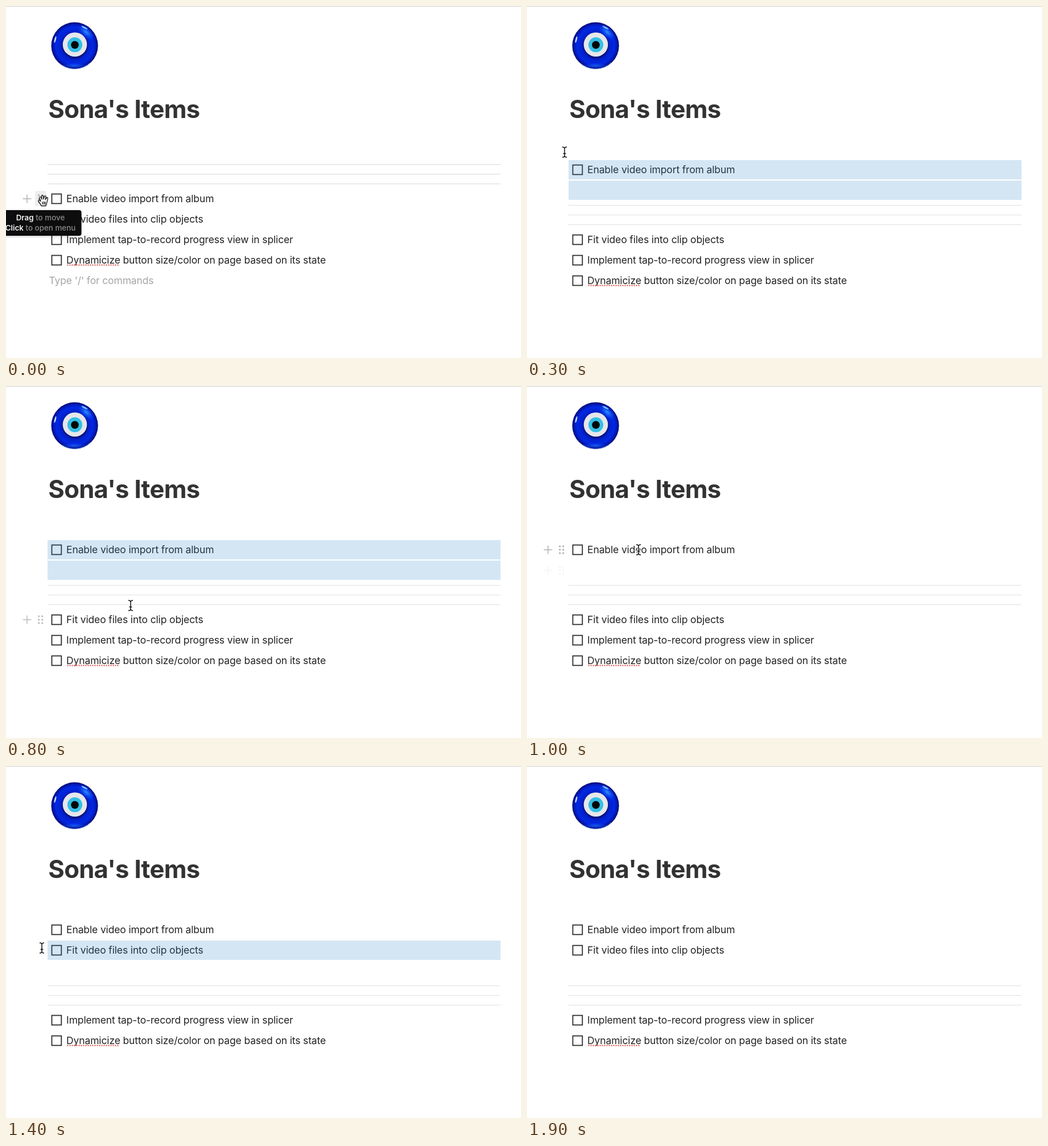
Animation of 905 by 619 pixels, one loop 2 s. Source, as an HTML page:

```html
<!DOCTYPE html>
<html lang="en">
<head>
<meta charset="utf-8">
<title>Items</title>
<style>
  html, body { margin: 0; width: 100%; height: 100%; overflow: hidden; background: #fff; }
  svg { display: block; width: 905px; height: 619px; font-family: Inter, "Liberation Sans", sans-serif; }
  text { white-space: pre; }
  .title { font-size: 43.6px; font-weight: 700; letter-spacing: -.7px; fill: #323232; }
  .row { font-size: 17.5px; letter-spacing: -.14px; fill: #222221; }
  .hint { fill: #a6a5a3; }
  .box { fill: none; stroke: #2c2c2a; stroke-width: 1.8; }
  .typo { stroke: #df625c; stroke-width: 2.5; stroke-linecap: round; stroke-dasharray: 0 4; }
  .rule { fill: #e1e1e0; }
  .select { fill: #2882c8; }
  .plus { fill: none; stroke: #999896; stroke-width: 1.5; }
  .dot { fill: #999896; }
  .tip { font-size: 13.4px; font-weight: 500; fill: #8b8b8b; text-anchor: middle; }
  .tip tspan { font-weight: 600; fill: #f4f4f4; }
  .hand { fill: #fff; stroke: #111; stroke-width: 1.3; stroke-linejoin: round; stroke-linecap: round; }
  .beam { fill: none; stroke: #111; stroke-width: 1.5; }
  .halo { stroke: #fff; stroke-width: 3.6; stroke-linecap: square; }
</style>
</head>
<body>
<svg viewBox="0 0 905 619">
  <defs>
    <radialGradient id="glass" cx=".5" cy=".5" r=".5">
      <stop offset=".5" stop-color="#0618a4"/>
      <stop offset=".64" stop-color="#0222d2"/>
      <stop offset=".8" stop-color="#0228e4"/>
      <stop offset=".91" stop-color="#0318b4"/>
      <stop offset="1" stop-color="#040c70"/>
    </radialGradient>
    <radialGradient id="shine">
      <stop offset="0" stop-color="#2f92ff"/>
      <stop offset="1" stop-color="#0a4cff" stop-opacity="0"/>
    </radialGradient>
    <filter id="shadow" x="-20%" y="-30%" width="140%" height="170%">
      <feDropShadow dx="0" dy="1" stdDeviation="2" flood-opacity=".25"/>
    </filter>
  </defs>
  <rect width="905" height="1" fill="#cdcdcd"/>
  <g>
    <circle cx="120.6" cy="69.7" r="41.1" fill="url(#glass)"/>
    <ellipse cx="141" cy="46" rx="18" ry="9" transform="rotate(42 141 46)" fill="url(#shine)"/>
    <ellipse cx="120" cy="105" rx="24" ry="5" fill="url(#shine)" opacity=".55"/>
    <path d="M98 103.5A40.6 40.6 0 0 0 148 99.5" fill="none" stroke="#4a6cdc" stroke-width="1"/>
    <ellipse cx="86.5" cy="59" rx="1.3" ry="6" transform="rotate(14 86.5 59)" fill="#d4e6ff"/>
    <ellipse cx="138" cy="38" rx="6" ry="1.4" transform="rotate(28 138 38)" fill="#7cc2ff"/>
    <circle cx="121.5" cy="70" r="22" fill="#050f6c" opacity=".7"/>
    <circle cx="121" cy="67.8" r="21.3" fill="#e6e6ea"/>
    <circle cx="121" cy="68.2" r="13.1" fill="#35bfe4"/>
    <circle cx="121" cy="68.4" r="6.8" fill="#050608"/>
  </g>
  <text class="title" x="74.3" y="197.3">Sona's Items</text>
  <g id="scene"></g>
</svg>
<script>
const STEP = 100;
const tasks = [
  "Enable video import from album",
  "Fit video files into clip objects",
  "Implement tap-to-record progress view in splicer",
  "Dynamicize button size/color on page based on its state"
];
const layouts = [
  { rows: [339, 375, 411, 447], rules: 278, hint: 483 },
  { rows: [288, 411, 447, 483], rules: 350 },
  { rows: [288, 324, 447, 483], rules: 386 }
];
const pair = [[288, .2], [324, .2]];

// Each step: layout, cursor [shape, x, y], then [y, opacity] lists and drag details.
const steps = [
  { layout: 0, cursor: ["open", 65, 342], grips: [[339, .75]], hover: 339, tip: true },
  { layout: 0, cursor: ["closed", 65, 318], drag: 0 },
  { layout: 0, cursor: ["closed", 66, 274], drag: 0, drop: 270 },
  { layout: 1, cursor: ["beam", 66, 257], selected: pair },
  { layout: 1, cursor: ["beam", 78, 310], selected: pair },
  { layout: 1, cursor: ["beam", 114, 402], selected: [...pair, [411, .15]], grips: [[367, .14], [384, .35], [411, 1]] },
  { layout: 1, cursor: ["beam", 170, 404], selected: pair, grips: [[411, .8]] },
  { layout: 1, cursor: ["beam", 212, 394], selected: pair, grips: [[411, .7]] },
  { layout: 1, cursor: ["beam", 219, 386], selected: pair, grips: [[411, .65]] },
  { layout: 1, cursor: ["beam", 209, 334], selected: pair, grips: [[324, .6]] },
  { layout: 1, cursor: ["beam", 196, 288], grips: [[288, .75], [324, .1]] },
  { layout: 1, cursor: ["beam", 130, 346], grips: [[324, .3]] },
  { layout: 1, cursor: ["open", 63, 411], grips: [[411, .75]], hover: 411 },
  { layout: 1, cursor: ["closed", 63, 352], drag: 1, drop: 306 },
  { layout: 2, cursor: ["beam", 63, 320], selected: [[324, .2]] },
  { layout: 2, cursor: ["beam", 68, 320], selected: [[324, .2]] },
  { layout: 2, cursor: ["beam", 92, 321], selected: [[324, .2]] },
  { layout: 2, cursor: ["beam", 120, 321] },
  { layout: 2, cursor: ["beam", 131, 321] },
  { layout: 2 }
];

const rect = (cls, x, y, w, h, extra = "") =>
  `<rect class="${cls}" x="${x}" y="${y}" width="${w}" height="${h}" ${extra}/>`;

const label = (text, x, y, cls = "") =>
  `<text class="row ${cls}" x="${x}" y="${y + 6.3}">${text}</text>`;

function task(index, y) {
  const typo = index === 3 ? `<path class="typo" d="M108.5 ${y + 8.6}H200"/>` : "";
  return rect("box", 80.5, y - 8.4, 16.8, 16.8) + label(tasks[index], 106.1, y) + typo;
}

function grip(y, alpha) {
  let dots = "";
  for (const x of [56.2, 62.2])
    for (const dy of [-6, 0, 6]) dots += rect("dot", x, y + dy - 1.5, 3, 3, 'rx="1"');
  return `<g opacity="${alpha}"><path class="plus" d="M29.5 ${y}h15m-7.5-7.5v15"/>${dots}</g>`;
}

const tooltip = () =>
  rect("", -10, 359, 142.5, 45, 'rx="4" fill="#0c0c0c" filter="url(#shadow)"') +
  '<text class="tip" x="60.5" y="377"><tspan>Drag</tspan> to move</text>' +
  '<text class="tip" x="60.5" y="395"><tspan>Click</tspan> to open menu</text>';

const beam = "M-4-9q4 0 4 3q0-3 4-3M0-6V6M-4 9q4 0 4-3q0 3 4 3M-2.5 2.5h5";
const shapes = {
  beam: `<path class="beam halo" d="${beam}"/><path class="beam" d="${beam}"/>`,
  open: `<path class="hand" d="M-3 9.5C-4 6-7 3.5-8 1c-.6-2 1.6-2.4 3-.6L-4 1.5-6-4.5c-.5-2 2-2.7 2.8-.8L-1.8-2-2.3-7.5
    c0-2 2.6-2 2.9 0L1.2-2.2 2.3-7c.5-1.9 2.9-1.4 2.7.5L4.4-1.5 6-4.4c1-1.6 3-.6 2.4 1.2L7 3C6.6 5.5 5.5 7 5 9.5Z"/>
    <path class="hand" d="M-.8 2.5v4M1.7 2.5v4M4 2.5v4"/>`,
  closed: `<path class="hand" d="M-3.5 8C-4 5.5-7 4-7 1.5-7-.3-5-.4-4.5 0V-2.5c.2-2 2.4-2 3-.6.4-1.6 2.5-1.5 3-.1
    .5-1.4 2.5-1.1 2.9.3.8-1 2.7-.6 2.7 1.2V2C7 5 5.5 6 5 8Z"/><path class="hand" d="M-1.2 1v3M1.4 1v3M4 1v3"/>`
};

function render({ layout, cursor, grips = [], selected = [], hover, drag, drop, tip }) {
  const { rows, rules, hint } = layouts[layout];
  const parts = [];
  for (let i = 0; i < 3; i++)
    parts.push(rect("rule", 73, rules + i * 17, 796, layout ? 1 : 1.4));
  parts.push(...rows.map((y, i) => task(i, y)));
  if (hint) parts.push(label("Type '/' for commands", 75.5, hint, "hint"));
  for (const [y, alpha] of selected)
    parts.push(rect("select", 73, y - 17, 796, 34, `opacity="${alpha}"`));
  if (hover) parts.push(rect("", 51, hover - 14, 20, 27, 'rx="3" fill="#eeeeed"'));
  parts.push(...grips.map(([y, alpha]) => grip(y, alpha)));
  if (drop) parts.push(rect("select", 73, drop - 2, 796, 4, 'opacity=".4"'));
  if (drag !== undefined) parts.push(`<g opacity=".35">${task(drag, cursor[2])}</g>`);
  if (tip) parts.push(tooltip());
  if (cursor) {
    const [shape, x, y] = cursor;
    parts.push(`<g transform="translate(${x} ${y})">${shapes[shape]}</g>`);
  }
  return parts.join("");
}

const scene = document.getElementById("scene");
let shown = -1;
function tick() {
  const index = Math.floor(performance.now() / STEP) % steps.length;
  if (index !== shown) scene.innerHTML = render(steps[shown = index]);
  requestAnimationFrame(tick);
}
tick();
</script>
</body>
</html>
```
